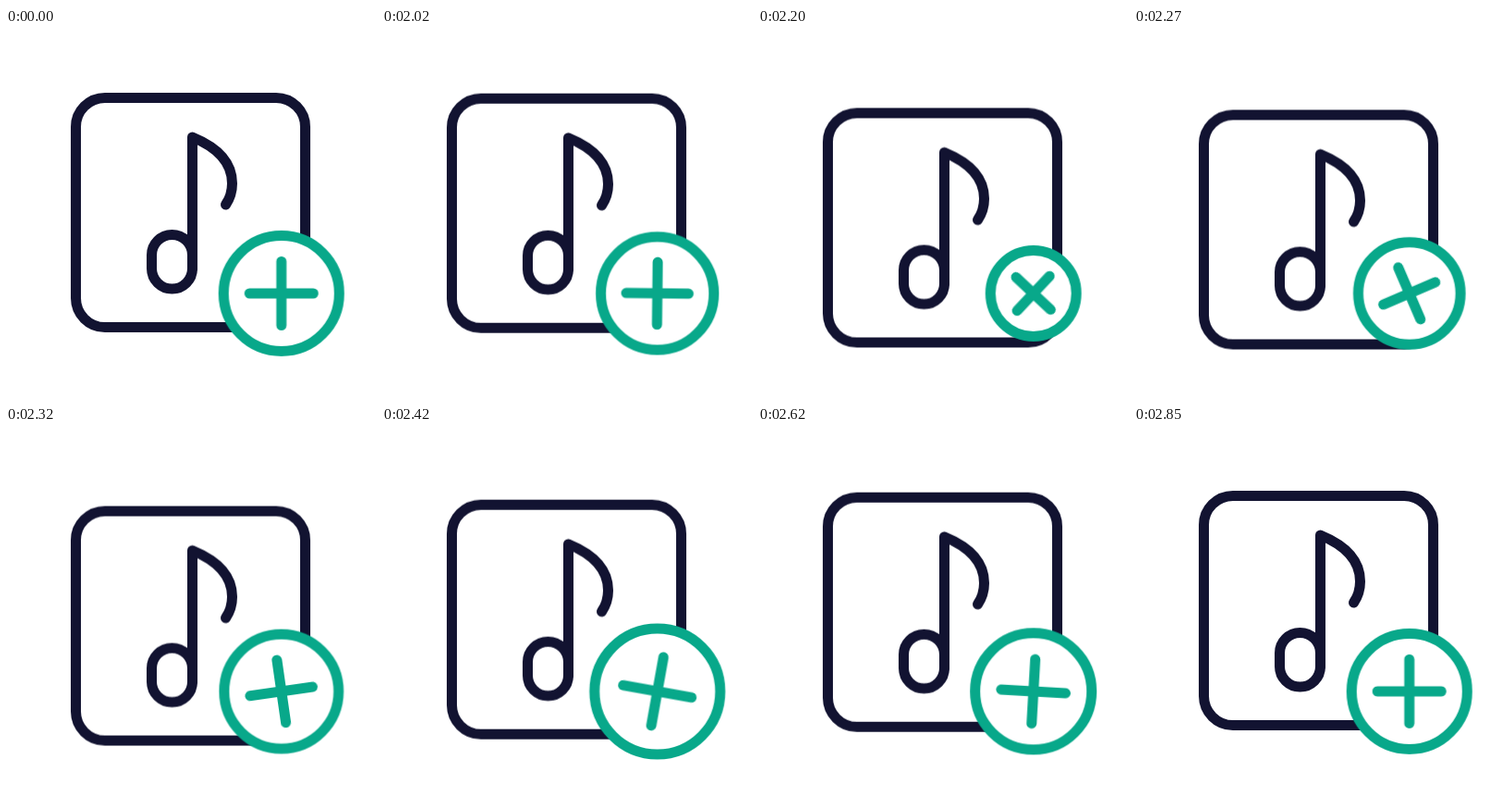
Recreate the animation shown at these times as an HTML page without scripts. Size 400 by 400 pixels, loop 2870 ms.

```html
<!DOCTYPE html>
<html lang="en">
<head>
<meta charset="utf-8">
<title>Add music</title>
<style>
  html, body { margin: 0; width: 100%; height: 100%; overflow: hidden; background: #fff; }
  svg { display: block; width: 100%; height: 100%; }
  .ink, .badge { fill: none; stroke-width: 11; stroke-linecap: round; stroke-linejoin: round; }
  .ink { stroke: #121331; }
  .badge { stroke: #08a88a; }
  .badge * { vector-effect: non-scaling-stroke; }
  .drop, .pulse, .turn { animation: 2870ms linear infinite; }
  .drop { animation-name: drop; }
  .pulse { animation-name: pulse; }
  .turn { animation-name: turn; }
  .pulse, .turn { transform-origin: 0 0; }

  @keyframes drop {
    0% { transform: translateY(0); }
    69.69% { transform: translateY(0); animation-timing-function: cubic-bezier(.2, 0, .6, 1); }
    78.99% { transform: translateY(18.5px); animation-timing-function: cubic-bezier(.164, 0, .307, 1); }
    97.56%, 100% { transform: translateY(0); }
  }
  @keyframes pulse {
    0% { transform: scale(1); }
    69.69% { transform: scale(1); animation-timing-function: cubic-bezier(.333, 0, .667, 1); }
    74.22% { transform: scale(.677); animation-timing-function: cubic-bezier(.333, 0, .667, 1); }
    83.97% { transform: scale(1.088); animation-timing-function: cubic-bezier(.333, 0, .667, 1); }
    93.03%, 100% { transform: scale(1); }
  }
  @keyframes turn {
    0% { transform: rotate(0deg); }
    69.69% { transform: rotate(0deg); animation-timing-function: cubic-bezier(.333, 0, .667, 1); }
    85.19% { transform: rotate(101deg); animation-timing-function: cubic-bezier(.25, 0, .25, 1); }
    99.3%, 100% { transform: rotate(90deg); }
  }
</style>
</head>
<body>
<svg viewBox="0 0 400 400">
  <g class="ink drop">
    <rect x="75.5" y="75.5" width="248" height="248" rx="31.5"/>
    <rect x="157.5" y="223.5" width="44" height="58.5" rx="22"/>
    <path d="M201.5 260V118C221 126 244.5 141 244.5 168C244.5 177 242 184.5 237.5 191"/>
  </g>
  <g class="badge" transform="translate(297.7 286.9)">
    <g class="pulse">
      <circle r="62.5" fill="#fff"/>
      <g class="turn">
        <path d="M-34.5 0H34.5M0 -34.5V34.5"/>
      </g>
    </g>
  </g>
</svg>
</body>
</html>
```
